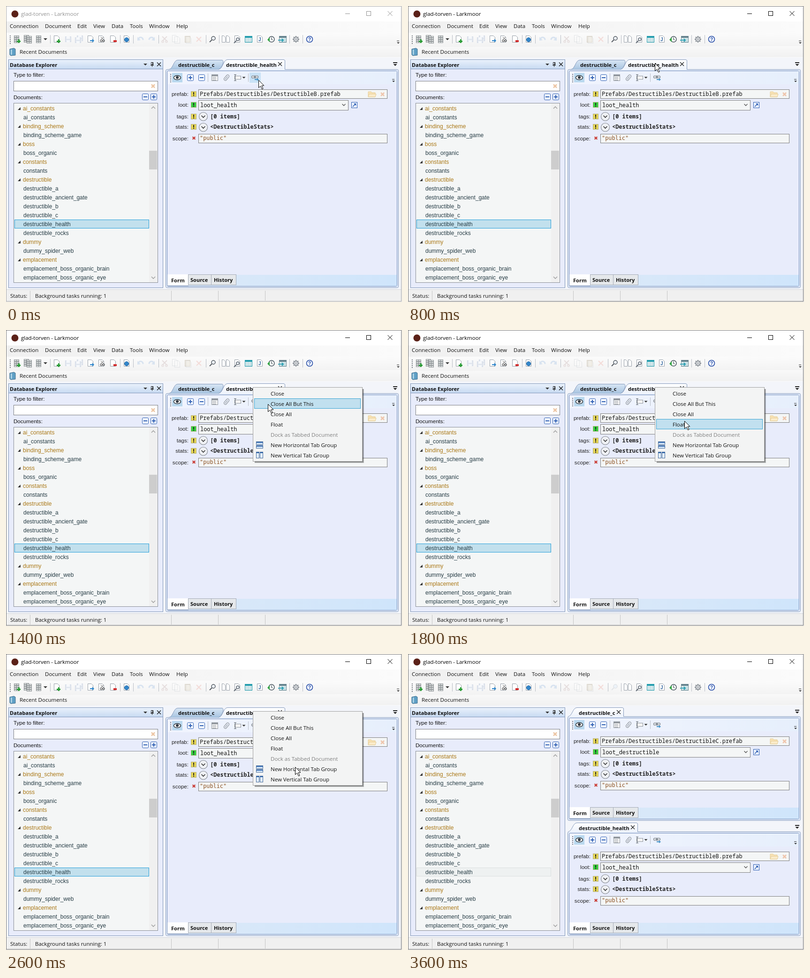
Write an HTML page with a canvas that moves like this. It is 844 px wide and 632 px high and loops after 4.2 s.

```html
<!DOCTYPE html>
<html lang="en">
<head>
<meta charset="utf-8">
<title>Tab groups</title>
<style>
html, body { margin: 0; width: 100%; height: 100%; overflow: hidden; background: #f0f0f0; }
canvas { display: block; width: 844px; height: 632px; }
</style>
</head>
<body>
<canvas id="stage" width="844" height="632"></canvas>
<script>
const c = document.getElementById('stage').getContext('2d');
const LOOP = 4200, STEP = 200;
const UI = '11.5px "Open Sans", sans-serif';
const BOLD = 'bold 11.1px "Open Sans", sans-serif';
const ARIAL = '12px "Liberation Sans", Arial, sans-serif';
const LABEL = '11.6px "Liberation Sans", Arial, sans-serif';
const MONO = '11.9px "Noto Sans Mono", monospace';
const CODE = '600 11.9px "Noto Sans Mono", monospace';
const QUOTE = '11.87px "DejaVu Sans Mono", monospace';
const BLUE = '#2f5fb3', LAV = '#e8ecfb', EDGE = '#8398ba';

// drawing helpers
function box(x, y, w, h, fill, stroke) {
  if (fill) { c.fillStyle = fill; c.fillRect(x, y, w, h); }
  if (stroke) { c.strokeStyle = stroke; c.lineWidth = 1; c.strokeRect(x + .5, y + .5, w - 1, h - 1); }
}
function round(x, y, w, h, r, fill, stroke) {
  c.beginPath(); c.roundRect(x + .5, y + .5, w - 1, h - 1, r); paint(fill, stroke);
}
function paint(fill, stroke, width = 1) {
  if (fill) { c.fillStyle = fill; c.fill(); }
  if (stroke) { c.strokeStyle = stroke; c.lineWidth = width; c.stroke(); }
}
function poly(points, fill, stroke, width = 1, close = true) {
  c.beginPath();
  for (let i = 0; i < points.length; i += 2) c.lineTo(points[i], points[i + 1]);
  if (close) c.closePath();
  paint(fill, stroke, width);
}
const line = (color, width, ...points) => poly(points, null, color, width, false);
function disc(x, y, r, fill, stroke, width) {
  c.beginPath(); c.arc(x, y, r, 0, 7); paint(fill, stroke, width);
}
function text(s, x, y, font, color = '#111', align = 'left') {
  c.font = font; c.fillStyle = color; c.textAlign = align; c.fillText(s, x, y + 4);
}
function grad(x0, y0, x1, y1, ...colors) {
  const g = c.createLinearGradient(x0, y0, x1, y1);
  colors.forEach((k, i) => g.addColorStop(i / (colors.length - 1), k));
  return g;
}
function cross(x, y, r, color, width) {
  line(color, width, x - r, y - r, x + r, y + r);
  line(color, width, x + r, y - r, x - r, y + r);
}
const down = (x, y, r = 4, color = '#333') => poly([x - r, y - r / 2, x + r, y - r / 2, x, y + r / 2], color);
const sep = (x, y, h = 18) => box(x, y - h / 2, 1, h, '#b9bec6');
const chevron = (x, y, r, color, up = 1, w = 1.3) => line(color, w, x - r, y - r / 2 * up, x, y + r / 2 * up, x + r, y - r / 2 * up);
function grip(x, y) {
  for (let i = 0; i < 5; i++) box(x, y - 8 + i * 4, 2, 2, '#70757d');
}
function overflow(x, y) {
  box(x - 3, y - 3, 5, 1, '#333');
  down(x, y + 2, 3);
}
function sign(x, y, plus) {
  round(x - 7, y - 7, 14, 14, 2, '#f4f8ff', BLUE);
  box(x - 4, y - 1, 8, 2, BLUE);
  if (plus) box(x - 1, y - 4, 2, 8, BLUE);
}

// toolbar icons, all around a centre point
function rack(x, y) {
  box(x - 6, y - 8, 11, 16, '#8d9295');
  for (let i = 0; i < 4; i++) box(x - 5, y - 7 + i * 4, 9, 2, '#e3e7e6');
  box(x - 1, y - 7, 1, 14, '#8d9295');
}
function sheet(x, y, mark, w = 11) {
  poly([x - 6.5, y - 7.5, x + w - 10, y - 7.5, x + w - 6.5, y - 4, x + w - 6.5, y + 6.5, x - 6.5, y + 6.5], '#fff', '#98a0a9');
  if (mark) box(x, y + 2, 7, 4, mark);
}
function plus(x, y) {
  box(x - 4, y - 1, 8, 3, '#2b9c36');
  box(x - 1, y - 4, 3, 8, '#2b9c36');
}
function disk(x, y) {
  box(x - 6, y - 6, 13, 12, '#e2e7ef', '#d3dae6');
  box(x - 3, y - 6, 7, 5, '#f6f8fb');
  box(x - 3, y + 2, 7, 4, '#f6f8fb');
}
function lens(x, y, color = '#555b62', r = 4) {
  disc(x + 2, y - 2, r, '#edf3f9', color, 1.5);
  line(color, 2, x - 1, y + 1, x - 6, y + 6);
}
function grid(x, y, color) {
  box(x - 8, y - 7, 16, 14, '#f6fbfc', color);
  box(x - 7, y - 6, 14, 3, color);
  for (let i = 0; i < 3; i++) {
    box(x - 4 + i * 4, y - 3, 1, 9, '#a4ccd3');
    box(x - 7, y - 1 + i * 3, 14, 1, '#a4ccd3');
  }
}
function turn(x, y, flip) {
  c.beginPath(); c.arc(x, y + 1, 5, flip ? 3.1 : 3.6, flip ? 5.8 : 6.4);
  paint(null, '#d8e3f0', 3);
  const k = flip ? 1 : -1;
  poly([x + k * 7, y - 5, x + k * 7, y + 3, x, y + 2], '#d8e3f0');
}
function clip(x, y) {
  c.save(); c.translate(x, y); c.rotate(.7);
  c.beginPath(); c.roundRect(-3, -7, 6, 14, 3); paint(null, '#92989f', 1.2);
  line('#92989f', 1.1, 0, -4, 0, 5);
  c.restore();
}
function eye(x, y) {
  c.beginPath(); c.ellipse(x, y, 7.5, 4.5, 0, 0, 7); paint('#fff', '#30363d', 1.5);
  disc(x, y - .5, 3, '#29313a');
  box(x - 1, y - 2, 1, 1, '#fff');
}
function link(x, y) {
  c.beginPath();
  c.roundRect(x - 7.5, y - 4, 8, 5, 2.5); c.roundRect(x - 1.5, y - 4, 8, 5, 2.5);
  paint('#e3e7eb', '#7b828a', 1.2);
  box(x - 4, y - 2, 7, 1, '#7b828a');
  line('#4593c8', 2, x - 1, y + 4, x + 6, y + 4);
  poly([x + 4, y + 1, x + 8, y + 4, x + 4, y + 7], '#4593c8');
}
function mainTools(findOff) {
  const y = 71;
  grip(8, y);
  rack(23, y); plus(27, y + 4);
  rack(44, y - 1); rack(50, y + 1);
  rack(70, y); down(84, y);
  sheet(109, y); plus(112, y + 4);
  disk(132, y); disk(157, y - 2); disk(153, y + 2);
  sheet(181, y); line('#2b83c9', 2, 179, 74, 187, 74); poly([184, 70, 188, 74, 184, 78], '#2b83c9');
  sheet(204, y); disc(203, 74, 2, null, '#555', 1.2); disc(208, 74, 2, null, '#555', 1.2);
  cross(205, 69, 3, '#666', 1);
  sheet(229, y, '#d32f2f');
  sheet(258, y); disc(257, 72, 4.5, '#3386c9', '#236aa9');
  turn(287, y); turn(310, y, true);
  cross(338, y - 1, 5, '#e6dede', 2); disc(334, 76, 2, null, '#e6dede', 1.5); disc(342, 76, 2, null, '#e6dede', 1.5);
  c.globalAlpha = .22;
  sheet(361, y - 1); sheet(366, y + 2);
  box(381, 64, 12, 14, '#c9b690', '#928568'); sheet(390, y + 2);
  c.globalAlpha = 1;
  cross(411, y, 5, '#f3dcd9', 2.3);
  lens(440, y, findOff ? '#e1e4e7' : '#555b62');
  sheet(467, y, null, 7); sheet(476, y, null, 7);
  sheet(494, y); lens(492, y + 2, '#626b75', 3);
  grid(517, y, '#259dae');
  sheet(542, y); text('J', 538, y, 'bold 10px "Liberation Sans", sans-serif', '#31659e');
  disc(566, y, 6, '#fff', '#46535d', 1.5); line('#46535d', 1.2, 566, 67, 566, 72, 569, 72);
  poly([557, 72, 562, 67, 562, 77], '#30a342');
  grid(590, y, '#65828d'); line('#30a0b3', 2, 580, 73, 590, 73); poly([588, 69, 593, 73, 588, 77], '#30a0b3');
  for (let i = 0; i < 4; i++) {
    const a = i * Math.PI / 4, dx = Math.cos(a) * 7, dy = Math.sin(a) * 7;
    line('#8a9097', 2.5, 618 - dx, y - dy, 618 + dx, y + dy);
  }
  disc(618, y, 4.5, '#dfe2e5', '#8a9097', 1.5); disc(618, y, 1.5, '#fff', '#8a9097');
  disc(647, y, 6.5, '#f1f6ff', '#2b50a8', 1.6);
  text('?', 647, y, 'bold 10px "Liberation Sans", sans-serif', '#2b50a8', 'center');
  [94, 243, 271, 325, 426, 454, 604, 632].forEach(x => sep(x, y));
  overflow(836, 77);
}

function chrome(active, split) {
  box(0, 0, 844, 632, '#f0f0f0');
  box(1, 1, 841, 32, '#fff');
  disc(19, 17, 7.5, '#5b2118');
  const ink = active ? '#000' : '#929292';
  text('glad-torven - Larkmoor', 32, 17, UI, ink);
  box(723, 16, 10, 1, ink);
  box(768, 11, 10, 10, null, ink);
  cross(818.5, 16, 5, ink, 1);

  box(1, 33, 841, 77, grad(0, 0, 844, 0, '#f0f0f0', '#fbfbfb'));
  box(1, 57, 841, 29, grad(0, 57, 0, 86, '#fbfbfb', '#f3f3f3'));
  box(1, 87, 841, 22, grad(0, 87, 0, 109, '#f8f8f8', '#f1f1f1'));
  ['Connection', 8, 'Document', 83, 'Edit', 152, 'View', 186, 'Data', 225, 'Tools', 264, 'Window', 305, 'Help', 363]
    .forEach((s, i, a) => { if (i % 2 === 0) text(s, a[i + 1], 43, UI); });
  mainTools(split);
  poly([8, 92, 17, 90, 20, 92, 20, 105, 10, 106, 8, 104], '#5e9fc5', '#416e8d');
  box(10, 93, 3, 11, '#a9d0e4');
  text('Recent Documents', 29, 98, UI);

  box(1, 110, 841, 496, '#f3f5fa');
  box(1, 606, 841, 24, '#f0f0f0');
  box(1, 605, 841, 1, '#d4d6da');
  [51, 352, 452, 552].forEach(x => box(x, 608, 1, 21, '#c5c5c5'));
  text('Status:', 9, 619, UI);
  text('Background tasks running: 1', 62, 619, UI);
  box(0, 0, 843, 631, null, active ? '#777' : '#aaa');
}

const TREE = ['+ai_constants', 'ai_constants', '+binding_scheme', 'binding_scheme_game', '+boss', 'boss_organic',
  '+constants', 'constants', '+destructible', 'destructible_a', 'destructible_ancient_gate', 'destructible_b',
  'destructible_c', 'destructible_health', 'destructible_rocks', '+dummy', 'dummy_spider_web', '+emplacement',
  'emplacement_boss_organic_brain', 'emplacement_boss_organic_eye'];

function explorer(focused) {
  box(5, 114, 330, 488, LAV, EDGE);
  box(6, 115, 328, 20, grad(0, 115, 0, 135, '#e9f1fb', '#c6d9f1'));
  box(6, 134, 328, 1, EDGE);
  text('Database Explorer', 8, 126, BOLD);
  down(297, 125);
  box(309, 120, 5, 6, null, '#222'); box(312, 120, 1, 6, '#222');
  box(308, 126, 7, 1, '#222'); box(311, 127, 1, 3, '#222');
  cross(326, 124.5, 4, '#222', 1.4);
  text('Type to filter:', 16, 147, LABEL);
  box(16, 160, 308, 22, '#fff', '#7e8084');
  cross(313.5, 171, 3.5, '#edc6a4', 2.6);
  text('Documents:', 16, 195, LABEL);
  sign(297, 194); sign(315, 194, true);

  box(16, 207, 308, 384, '#f4f6f6', '#8b9098');
  box(305, 208, 18, 382, '#f0f0f0');
  box(305, 309, 17, 40, '#cdcdcd');
  chevron(314, 217, 4, '#999', -1);
  chevron(314, 580, 4, '#999');
  box(18, 456, 287, 19, focused ? '#c2e0ed' : '#eef1f1', focused ? '#26a0da' : '#dce0e0');
  TREE.forEach((s, i) => {
    const y = 219 + i * 19;
    if (s[0] !== '+') return text(s, 37, y, ARIAL, '#263c45');
    poly([31, y - 3, 31, y + 3, 25, y + 3], '#333');
    text(s.slice(1), 36, y, ARIAL, '#aa7817');
  });
}

function tab(x, right, top, base, label, tx, active) {
  c.beginPath();
  c.moveTo(x, base + .5);
  c.bezierCurveTo(x + 9, base, x + 10, top + .5, x + 19, top + .5);
  c.lineTo(right - 2, top + .5);
  if (active) { c.lineTo(right + .5, top + 2); c.lineTo(right + .5, base + .5); }
  else c.bezierCurveTo(right + 4, top + 4, right - 6, base, right - 10, base + .5);
  paint(active ? grad(0, top, 0, base, '#fff', '#eef3fc') : grad(0, top, 0, base, '#d9e7f5', '#a9c5e1'), EDGE);
  if (active) {
    box(x + 1, base, right - x - 1, 1, '#eef3fc');
    cross(right - 10, top + 10, 4, '#222', 1.3);
  }
  text(label, tx, 126 + (base > 200 ? 246 : 0), BOLD);
}

function docTools(y, hover) {
  box(345, y - 14, 488, 28, grad(345, 0, 833, 0, '#f1f4fe', '#e6effc'));
  grip(350, y);
  box(354, y - 10, 22, 20, '#b9d8ee');
  eye(365, y);
  sign(393, y, true); sign(417, y);
  sep(430, y); sep(516, y);
  box(438, y - 7, 14, 14, '#f5f5f5', '#92989f');
  box(439, y - 6, 12, 3, '#92989f');
  for (let i = 0; i < 3; i++) box(440, y - 1 + i * 3, 8, 1, '#92989f');
  clip(470, y);
  box(487, y - 4, 14, 8, '#f5f5f5', '#92989f');
  box(488, y - 6, 1, 13, '#60666d'); box(486, y - 7, 5, 1, '#60666d'); box(486, y + 6, 5, 1, '#60666d');
  down(507, y, 3.5);
  if (hover) box(519, y - 11, 24, 22, '#c9e2f6');
  link(531, y);
  overflow(826, y + 6);
}

function badge(y, color) {
  box(394, y - 6, 12, 12, color, '#b5b184');
  box(399, y - 4, 2, 5, '#222'); box(399, y + 2, 2, 2, '#222');
}

function form(y, prefab, loot) {
  ['prefab:', 188, 'loot:', 211, 'tags:', 236, 'stats:', 258, 'scope:', 283]
    .forEach((s, i, a) => { if (i % 2 === 0) text(s, 389, y + a[i + 1], LABEL, '#222', 'right'); });
  [188, 236, 258].forEach(d => badge(y + d, '#e6d656'));
  badge(y + 211, '#35d23f');
  cross(400.5, y + 282, 2.8, '#c93a32', 2.3);
  box(410, y + 178, 403, 20, '#f4f6f6', '#808080');
  text(prefab, 413, y + 188, MONO);
  poly([772, y + 183, 778, y + 183, 780, y + 185, 787, y + 185, 787, y + 194, 772, y + 194], '#f8e2b4', '#e5cd98');
  poly([774, y + 188, 789, y + 188, 787, y + 194, 772, y + 194], '#fbecca', '#e5cd98');
  cross(802.5, y + 188.5, 3.5, '#efc6ad', 2.6);
  box(410, y + 201, 320, 22, '#f4f6f6', '#808080');
  text(loot, 414, y + 212, MONO);
  chevron(720, y + 211, 3.5, '#555');
  box(736, y + 205, 13, 13, '#eef4ff', BLUE);
  line(BLUE, 1.6, 739, y + 215, 745, y + 209);
  poly([741, y + 208, 746, y + 208, 746, y + 213], BLUE);
  [236, 259].forEach(d => {
    disc(420.5, y + d, 9, '#eff1f5', '#858a91', 1.1);
    chevron(420.5, y + d, 4, '#333', 1, 1.6);
  });
  text('[0 items]', 435, y + 236, CODE, '#222');
  text('<DestructibleStats>', 435, y + 258, CODE, '#222');
  box(410, y + 273, 403, 20, '#f4f6f6', '#808080');
  text('"public"', 413, y + 282, QUOTE, '#8d5222');
}

function pane(y, bottom, prefab, loot, hover) {
  const top = y + 135;
  round(340, top, 497, bottom - top + 1, 3, '#e6eefb', EDGE);
  round(343, top + 3, 491, bottom - top - 5, 2, LAV, '#6f89b6');
  docTools(y + 153, hover);
  form(y, prefab, loot);
  box(344, bottom - 27, 489, 24, grad(344, 0, 833, 0, '#dce9f8', '#cfe5fb'));
  box(344, bottom - 28, 45, 25, '#fff');
  box(388, bottom - 28, 50, 23, '#e5e8eb', '#a5acb7');
  box(437, bottom - 28, 54, 23, '#e5e8eb', '#a5acb7');
  box(344, bottom - 4, 45, 1, EDGE);
  text('Form', 352, bottom - 15, BOLD);
  text('Source', 393, bottom - 16, BOLD);
  text('History', 443, bottom - 16, BOLD);
}

function stripMenu(y) {
  box(825, y - 4, 9, 2, '#222');
  down(829.5, y + 2, 4, '#222');
}

function documents(split, hover) {
  const b = 'Prefabs/Destructibles/DestructibleB.prefab';
  if (!split) {
    pane(0, 601, b, 'loot_health', hover);
    tab(347, 463, 115, 135, 'destructible_c', 367, false);
    tab(453, 594, 114, 135, 'destructible_health', 469, true);
    stripMenu(124);
    return;
  }
  pane(-2, 355, b.replace('B.', 'C.'), 'loot_destructible');
  tab(341, 459, 114, 133, 'destructible_c', 364, true);
  stripMenu(123);
  pane(244, 601, b, 'loot_health');
  tab(341, 489, 360, 379, 'destructible_health', 364, true);
  stripMenu(369);
}

const ITEMS = ['Close', 'Close All But This', 'Close All', 'Float', 'Dock as Tabbed Document'];

function menu(items, w, alpha, hot) {
  const h = items.length * 22 + 5, shade = 'rgba(0,0,0,.2)';
  c.globalAlpha = alpha;
  for (let i = 1; i < 4; i++) {
    box(526 + w, 126, i, h - 4, shade);
    box(530, 122 + h, w - 4 + i, i, shade);
  }
  box(526, 122, w, h, '#f3f4f4');
  box(526, 122, w, h, null, '#a0a0a0');
  items.forEach((s, i) => {
    const y = 136 + i * 22;
    if (i === hot) box(529, y - 12, 227, 22, '#c1e0ef', '#3ba4d4');
    text(s, 564, y, UI, i === 4 ? '#808080' : '#111');
  });
  if (items.length === 7) {
    for (let i = 0; i < 2; i++) {
      box(533, 238 + i * 8, 15, 7, '#d7e8fa', '#466a9a');
      box(534, 239 + i * 8, 13, 2, '#386db2');
      box(533 + i * 8, 260, 7, 14, '#e2effd', '#466a9a');
      box(534 + i * 8, 261, 5, 2, '#386db2');
    }
  }
  c.globalAlpha = 1;
}

// pointer stops: time, x, y
const PATH = [[0, 538, 158], [400, 528, 126], [600, 526, 122], [1000, 526, 122],
  [1800, 589, 194], [2000, 590, 196], [2600, 616, 241], [LOOP, 616, 241]];

function pointerAt(t) {
  const i = PATH.findIndex(p => p[0] > t);
  const [t0, x0, y0] = PATH[i - 1], [t1, x1, y1] = PATH[i];
  const k = (t - t0) / (t1 - t0), e = k * k * (3 - 2 * k);
  return [Math.round(x0 + (x1 - x0) * e), Math.round(y0 + (y1 - y0) * e)];
}
function pointer(x, y) {
  c.save(); c.translate(x + .5, y + .5);
  poly([0, 0, 0, 16, 4, 12.5, 7, 19, 9.5, 18, 6.5, 11.5, 11.5, 11.5], '#fff', '#000');
  c.restore();
}

function draw(t) {
  const split = t >= 2800, [x, y] = pointerAt(t);
  chrome(t >= 600, split);
  explorer(!split);
  documents(split, t < 200);
  if (t >= 1000 && !split) {
    const row = Math.floor((y - 124) / 22);
    const hot = t < 2600 && row !== 4 ? row : -1;
    menu([...ITEMS, 'New Horizontal Tab Group', 'New Vertical Tab Group'], 234, t < 1200 ? .92 : 1, hot);
  }
  if (split && t < 3000) menu([...ITEMS, 'Move To Previous Tab Group'], 243, .4, -1);
  if (t < 3200) pointer(x, y);
}

let shown = -1;
const start = performance.now();
function tick() {
  const t = Math.floor((performance.now() - start) % LOOP / STEP) * STEP;
  if (t !== shown) draw(shown = t);
  requestAnimationFrame(tick);
}
draw(shown = 0);
requestAnimationFrame(tick);
</script>
</body>
</html>
```
